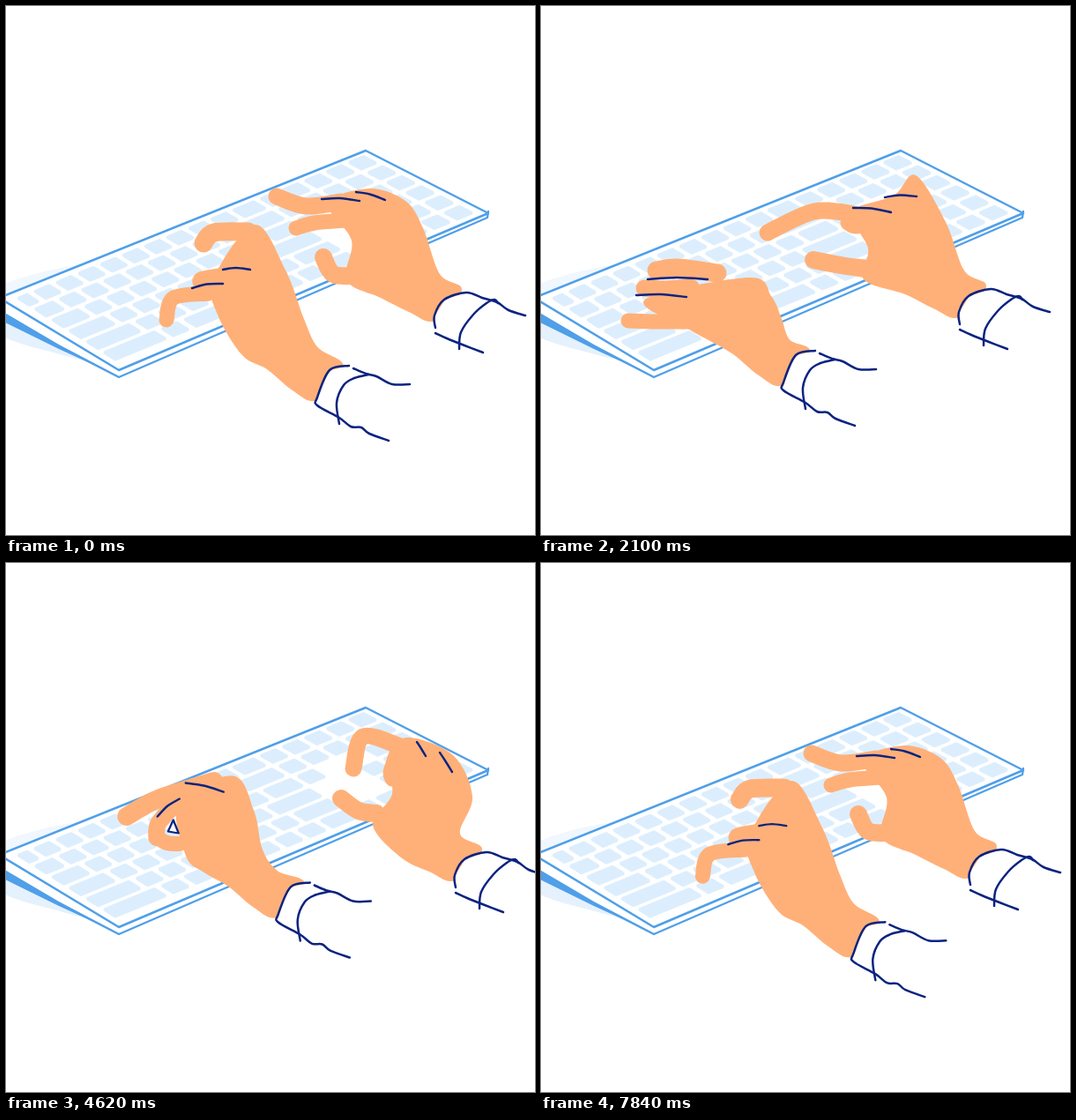
Recreate the animation shown at these times as an HTML page with a canvas. Size 600 by 600 pixels, loop 7.91 s.

```html
<!DOCTYPE html>
<html lang="en">
<head>
<meta charset="utf-8">
<title>Typing hands</title>
<style>
html, body { margin: 0; width: 100%; height: 100%; overflow: hidden; background: #fff; }
canvas { display: block; width: 600px; height: 600px; }
</style>
</head>
<body>
<canvas id="stage" width="600" height="600"></canvas>
<script>
const ctx = document.getElementById('stage').getContext('2d');
const SKIN = '#ffb078', NAVY = '#0b2380', BLUE = '#4f9fe9', KEY = '#dceefe';
const STEP = 70, LOOP = 7910, BEAT = 140;

const pts = s => s.split(' ').map(p => p.split(',').map(Number));
const mix = (a, b, k) => a + (b - a) * k;
const blend = (p, q, k) => p.map((v, i) => [mix(v[0], q[i][0], k), mix(v[1], q[i][1], k)]);
const add = ([x, y], [dx, dy]) => [x + dx, y + dy];
const shift = (p, d) => p.map(v => add(v, d));
const middle = (p, q, d) => add([(p[0] + q[0]) / 2, (p[1] + q[1]) / 2], d);

// Smooth curve through the points
function curve(p, closed) {
  const n = p.length;
  const at = i => closed ? p[(i + n) % n] : p[Math.max(0, Math.min(n - 1, i))];
  ctx.beginPath();
  ctx.moveTo(...p[0]);
  for (let i = 0; i < (closed ? n : n - 1); i++) {
    const [a, b, c, d] = [at(i - 1), at(i), at(i + 1), at(i + 2)];
    ctx.bezierCurveTo(b[0] + (c[0] - a[0]) / 6, b[1] + (c[1] - a[1]) / 6,
      c[0] - (d[0] - b[0]) / 6, c[1] - (d[1] - b[1]) / 6, ...c);
  }
}
function poly(p, closed) {
  ctx.beginPath();
  p.forEach(q => ctx.lineTo(...q));
  if (closed) ctx.closePath();
}
function fill(color) { ctx.fillStyle = color; ctx.fill(); }
function stroke(color, width) {
  ctx.strokeStyle = color;
  ctx.lineWidth = width;
  ctx.lineCap = ctx.lineJoin = 'round';
  ctx.stroke();
}

// Keyboard: six rows, sixteen units wide, main block ends at unit EDGE
const AREA = pts('6,331 406,167 537,235 123,405');
const EDGE = 11;

function onBoard(x, y) {
  const [a, b, c, d] = AREA, u = x / 16, v = y / 6;
  return [0, 1].map(i => mix(mix(a[i], b[i], u), mix(d[i], c[i], u), v));
}
function keyWidth(row, x) {
  if (x === 0) return .75 + .36 * row;
  if (row === 5 && x > 3 && x < 4) return 4;
  if (x < EDGE && x + 2.2 > EDGE) return EDGE - x;
  return 1;
}
function isHole(row, x) {
  const from = row > 2 ? EDGE : EDGE + 1;
  return row > 1 && row < 5 && x > from - .1 && x < from + 1.9;
}
function drawKeys() {
  for (let row = 0; row < 6; row++) {
    for (let x = 0, w; x < 15.9; x += w) {
      w = keyWidth(row, x);
      if (isHole(row, x)) continue;
      const l = x + .2, r = x + w - .2, t = row + .21, b = row + .79;
      poly([onBoard(l, t), onBoard(r, t), onBoard(r, b), onBoard(l, b)], true);
      fill(KEY);
      stroke(KEY, 4.5);
    }
  }
}
function drawBoard() {
  curve(pts('-4,317 40,302 100,289 172,264 100,310 -4,332'), true);
  fill('#f0f7fe');
  curve(pts('-4,352 40,370 98,402 50,392 -4,374'), true);
  fill('#e5f1fd');
  poly(pts('-3,328 408,164 547,235 546,240 128,421 -3,350'), true);
  fill('#fff');
  drawKeys();
  poly(pts('-3,347 60,384 128,420 60,389 -3,358'), true);
  fill(BLUE);
  poly(pts('-3,329 408,164 547,235 128,413 -3,334'));
  stroke(BLUE, 2.5);
  poly(pts('547,233 546,240 128,421 60,386'));
  stroke(BLUE, 2.3);
}

// Each pose: cuff offset, palm rim, three fingers of three joints, two creases
const parse = poses => Object.fromEntries(Object.entries(poses).map(([k, s]) => [k, pts(s)]));
const left = {
  poses: parse({
    A: '0,0 338,355 282,248 235,310 240,350 275,256 236,257 224,269 252,305 224,310 221,313 230,326 190,331 182,356 246,299 277,299 211,320 246,315',
    B: '-19,-25 321,336 275,241 216,286 219,331 260,247 226,248 214,256 233,281 200,289 194,293 208,310 176,314 177,344 232,274 259,273 196,298 226,290',
    C: '-86,-12 265,360 228,313 110,338 157,370 192,308 147,302 123,305 162,324 132,326 109,325 162,363 122,363 91,362 113,315 181,315 100,333 157,335',
    D: '-38,-23 298,345 262,254 195,283 206,347 230,268 180,292 145,305 195,298 176,310 173,335 174,337 185,343 198,346 210,271 248,282 178,306 202,289',
    E: '-45,-45 290,325 257,242 195,270 203,332 235,248 172,268 136,288 190,275 172,296 170,312 171,312 182,318 196,319 203,250 246,260 171,288 196,268'
  }),
  widths: [21, 19, 17],
  wrist: pts('383,409 352,447'),
  heel: pts('268,396 296,412 325,436'),
  edge: (top, [side, knuckle, ...rest]) =>
    [middle(top, side, [-7, 5]), side, middle(side, knuckle, [7, -2]), knuckle, ...rest],
  cuff: pts('389,408 368,413 356,433 352,452 378,466 375,447 385,427 411,418'),
  sleeve: ['389,408 367,413 353,444 353,453 378,467 391,477 403,478 412,485 434,493',
    '394,411 408,417 420,420 438,429 458,429', '411,418 395,422 383,430 375,450 378,474'].map(pts)
};
const right = {
  poses: parse({
    A: '0,0 473,252 453,221 412,207 365,224 392,266 386,311 380,222 340,227 307,216 385,243 350,246 329,252 395,306 371,304 360,285 358,219 401,221 397,211 430,220',
    B: '-10,10 464,258 433,210 406,229 360,246 376,288 372,318 365,249 318,243 268,267 385,256 365,262 355,257 372,308 340,305 317,298 363,238 403,246 400,230 433,229',
    C: '-12,-4 459,245 425,192 400,215 352,234 371,275 366,310 355,236 310,233 257,257 380,244 358,250 348,246 368,298 340,294 309,288 354,229 397,234 390,217 426,216',
    D: '3,-2 487,262 466,217 415,201 380,218 403,258 393,308 390,213 350,214 332,212 392,230 365,240 350,241 400,297 379,298 366,277 384,205 417,214 421,203 447,217',
    E: '23,3 529,265 507,218 455,198 432,222 438,262 416,297 445,207 405,197 394,233 440,225 436,238 438,245 420,284 400,281 380,267 466,203 476,219 492,215 506,237'
  }),
  widths: [19, 17, 20],
  wrist: pts('517,322 486,357'),
  heel: pts('425,331 457,347'),
  edge: (top, rim) => [add(top, [-25, -18]), ...rim],
  cuff: pts('522,325 498,333 486,352 487,371 514,383 519,364 532,347 557,335'),
  sleeve: ['487,365 486,351 497,333 522,325 540,331 557,336 570,345 589,351',
    '487,371 500,377 520,385 541,393',
    '558,337 554,333 545,337 530,350 516,370 514,389'].map(pts)
};
const ORDER = 'ACCEEBBACCDDADCCEEACCEAACEADCE';
const CYCLE = ORDER.length * BEAT;

function drawHand(hand, pose, sway) {
  const cuffAt = add(pose[0], sway);
  const p = shift(pose, sway);
  const [top, bottom] = shift(hand.wrist, cuffAt);
  const fingers = p.slice(-13, -4);

  curve([top, ...hand.edge(top, p.slice(1, -13)), ...shift(hand.heel, cuffAt), bottom], true);
  fill(SKIN);
  hand.widths.forEach((w, i) => {
    curve(fingers.slice(i * 3, i * 3 + 3));
    stroke(SKIN, w);
  });
  for (const [a, b] of [p.slice(-4, -2), p.slice(-2)]) {
    curve([a, middle(a, b, [-1, -2]), b]);
    stroke(NAVY, 2.4);
  }
  // A left finger curled back on itself leaves a small gap
  const base = fingers[6], tip = fingers[8];
  if (hand === left && tip[0] > base[0]) {
    poly(shift(pts('-13,-14 -7,-27 -1,-12'), tip), true);
    fill('#fff');
    stroke(NAVY, 2.2);
  }
  poly(shift(hand.cuff, cuffAt), true);
  fill('#fff');
  hand.sleeve.forEach(l => { curve(shift(l, cuffAt)); stroke(NAVY, 2.5); });
}

function draw(now) {
  const t = Math.floor(now % LOOP / STEP) * STEP % CYCLE;
  const beat = Math.floor(t / BEAT);
  const from = ORDER[beat], to = ORDER[(beat + 1) % ORDER.length];
  const k = (1 - Math.cos(Math.PI * (t / BEAT - beat))) / 2;
  const drift = Math.sin(Math.PI * t / CYCLE) ** 2;
  const poseOf = hand => blend(hand.poses[from], hand.poses[to], k);

  ctx.clearRect(0, 0, 600, 600);
  drawBoard();
  drawHand(right, poseOf(right), [0, 0]);
  drawHand(left, poseOf(left), [8 * drift, -5 * drift]);
}

const start = performance.now();
function tick() {
  draw(performance.now() - start);
  requestAnimationFrame(tick);
}
tick();
</script>
</body>
</html>
```
